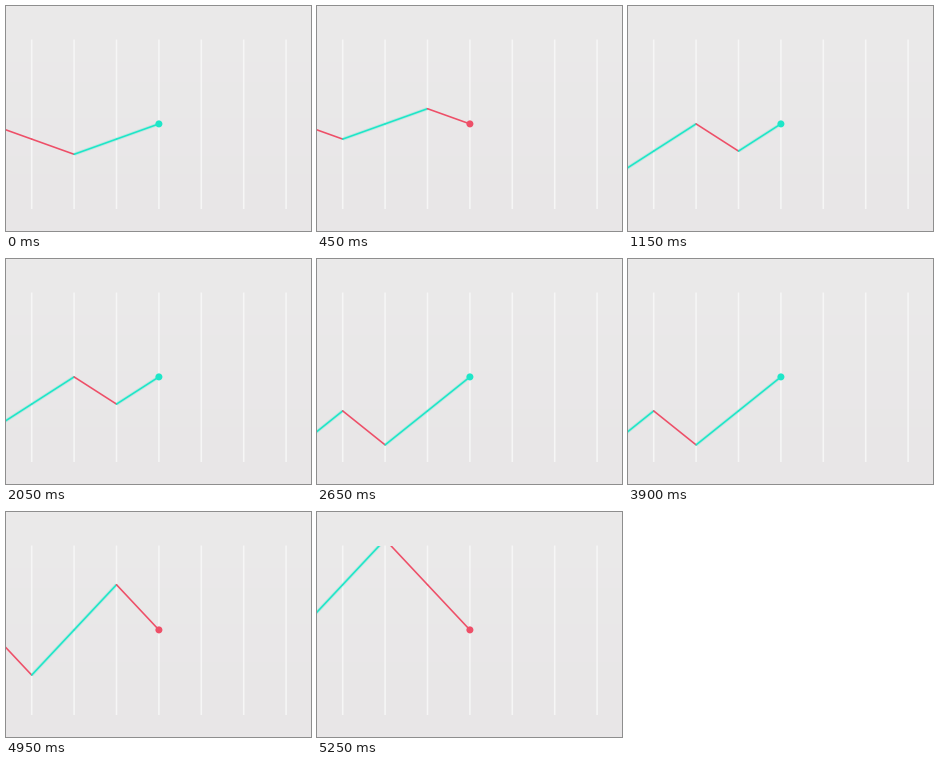
These frames come from a looping animation (305 by 225 pixels, 6.25 s). A matplotlib script:

```python
import matplotlib.pyplot as plt
import numpy as np
from matplotlib.animation import FuncAnimation
from matplotlib.collections import LineCollection
from matplotlib.colors import LinearSegmentedColormap
from matplotlib.patches import Circle, Rectangle

W, H, DPI = 305, 225, 100
LOOP_MS, STEP_MS = 6250, 50
TOP, BOTTOM = 33.5, 203
GRID_X, GAP = 25.7, 42.4
HEAD = (GRID_X + 3 * GAP, 117.9)

BACK_TOP, BACK, GRID = "#ebeaea", "#e8e6e7", "#f6f6f6"
UP, DOWN = "#1ee6c8", "#ee4f68"

VALUES = np.array([2, 1, 0, 1, 2, 1, 2, 3, 2, 1])
TICKS = [0, 50, 700, 2550, 4000, 5250]       # start of each pose in ms
UNITS = [15.2, 15.2, 27.2, 34, 45.2, 45.2]   # pixels per value
FIRST_HEAD = 4


def px(width):
    return width * 72 / DPI


fig = plt.figure(figsize=(W / DPI, H / DPI), dpi=DPI, facecolor=BACK)
ax = fig.add_axes([0, 0, 1, 1])
ax.axis("off")

shade = LinearSegmentedColormap.from_list("shade", [BACK_TOP, BACK])
ax.imshow(np.linspace(0, 1, H)[:, None], cmap=shade, aspect="auto",
          extent=(0, W, H, 0), zorder=0)
ax.set_xlim(0, W)
ax.set_ylim(H, 0)

ax.vlines(GRID_X + GAP * np.arange(7), TOP, BOTTOM, color=GRID, lw=px(1.6),
          snap=False)

window = Rectangle((0, TOP), W, BOTTOM - TOP, transform=ax.transData)


def add_trend(width, **style):
    lines = LineCollection([], linewidths=px(width), **style)
    ax.add_collection(lines, autolim=False)
    lines.set_clip_path(window)
    return lines


glow = add_trend(3.4, color=UP, alpha=0.2, capstyle="butt", zorder=3)
trend = add_trend(1.6, capstyle="round", zorder=4)
dot = ax.add_patch(Circle(HEAD, 3.5, lw=0, zorder=5))


def draw(i):
    tick = np.searchsorted(TICKS, i * STEP_MS, side="right") - 1
    head = FIRST_HEAD + tick
    vals = VALUES[:head + 1]
    rising = np.diff(vals) > 0
    x = HEAD[0] + GAP * (np.arange(head + 1) - head)
    y = HEAD[1] + UNITS[tick] * (vals[-1] - vals)
    points = np.column_stack([x, y])
    segments = np.stack([points[:-1], points[1:]], axis=1)
    colors = [UP if r else DOWN for r in rising]
    glow.set_segments(segments[rising])
    trend.set_segments(segments)
    trend.set_color(colors)
    dot.set_facecolor(colors[-1])
    return glow, trend, dot


anim = FuncAnimation(fig, draw, frames=LOOP_MS // STEP_MS, interval=STEP_MS,
                     repeat=True, repeat_delay=0)
plt.show()
```
